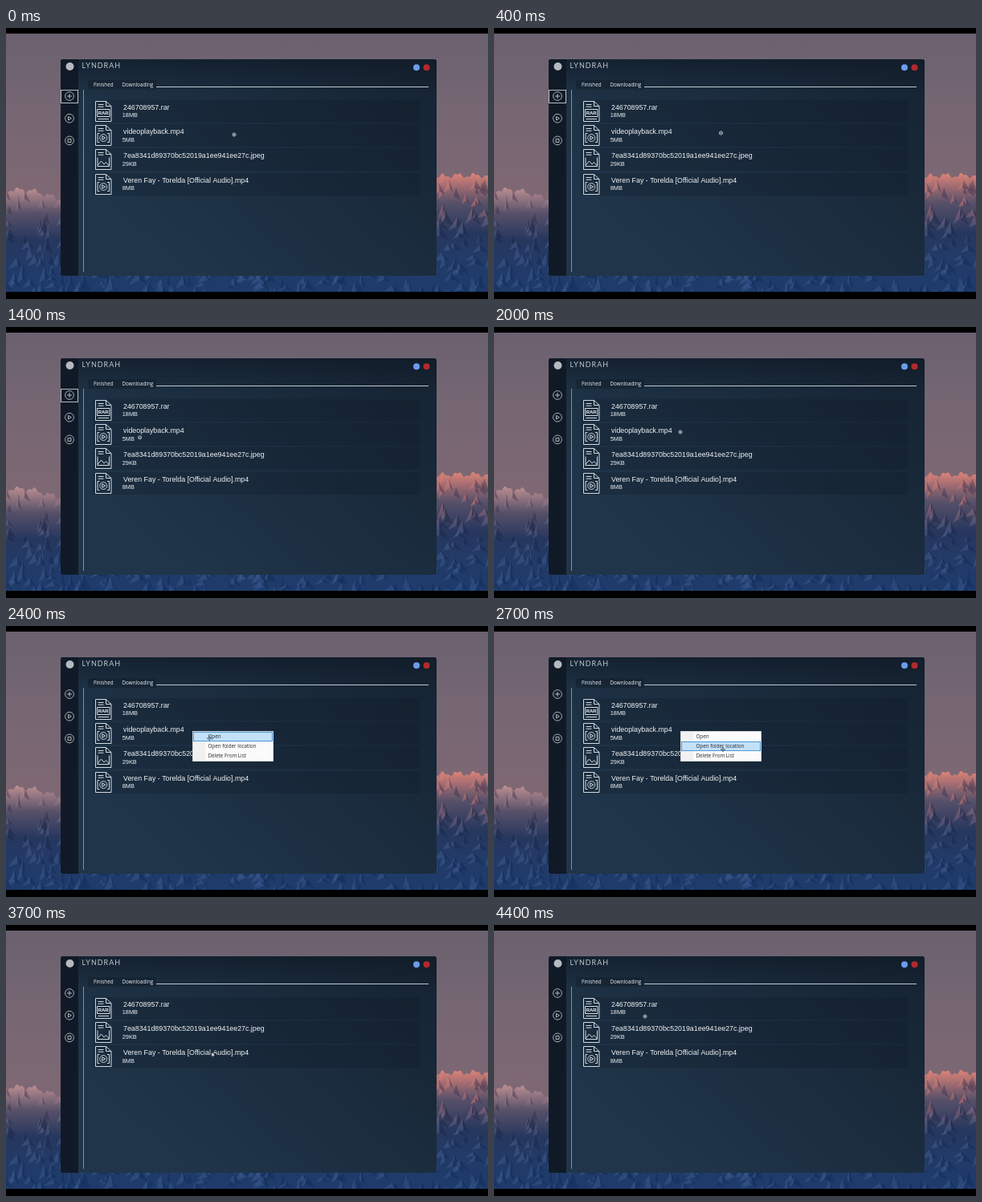
Write an HTML page with a canvas that moves like this. It is 600 by 338 pixels and loops after 4.5 s.

```html
<!DOCTYPE html>
<html lang="en">
<head>
<meta charset="utf-8">
<title>Download list</title>
<style>
html, body { margin: 0; width: 100%; height: 100%; overflow: hidden; background: #000; }
canvas { display: block; width: 600px; height: 338px; }
</style>
</head>
<body>
<canvas id="stage" width="600" height="338"></canvas>
<script>
const W = 600, H = 338, LOOP = 4500, STEP = 100;
const SKY_TOP = 7, SKY_END = 329;
const BLUR = 1800, MENU_OPEN = 2100, REMOVED = 3700;
const SANS = '"Liberation Sans", Arial, sans-serif';
const UI = '"Open Sans", "Noto Sans", sans-serif';
const INK = '#f0f2f4', STROKE = '#d3dadf', DIM = '#b4bcc3';

const view = document.getElementById('stage').getContext('2d');
const backdrop = document.createElement('canvas');
backdrop.width = W;
backdrop.height = H;
let g = backdrop.getContext('2d');

const files = [
  { name: '246708957.rar', size: '18MB', icon: 'rar' },
  { name: 'videoplayback.mp4', size: '5MB', icon: 'video' },
  { name: '7ea8341d89370bc52019a1ee941ee27c.jpeg', size: '29KB', icon: 'image' },
  { name: 'Veren Fay - Torelda [Official Audio].mp4', size: '8MB', icon: 'video' }
];
const menuItems = ['Open', 'Open folder location', 'Delete From List'];

// Each move glides the pointer to x, y between two times.
const home = { x: 284, y: 133 };
const moves = [
  { from: 0, to: 800, x: 281, y: 129 },
  { from: 1000, to: 1500, x: 138, y: 140 },
  { from: 1600, to: 2000, x: 232, y: 131 },
  { from: 2200, to: 2700, x: 285, y: 154 },
  { from: 2800, to: 3300, x: 257, y: 162 },
  { from: 3700, to: 4200, x: 196, y: 138 },
  { from: 4200, to: 4400, x: 188, y: 114 }
];

const shapes = {
  page: new Path2D('M0 0H13L19.5 6V25H0Z M13 0V6H19.5 M3 4H10 M3 6.7H10'),
  rar: new Path2D('M2 10H17.5V19H2Z M3 22H16.5'),
  video: new Path2D('M5 10H2.5V21H5 M14.5 10H17V21H14.5 M8.3 13.2L12.2 15.5L8.3 17.8Z'),
  image: new Path2D('M2.5 10V21H17V10 M2.5 20L7 14.5L10.5 18.5L13 16L17 20.5'),
  plus: new Path2D('M-3 0H3 M0 -3V3'),
  play: new Path2D('M-1.5 -2.3L2.3 0L-1.5 2.3Z'),
  stop: new Path2D('M-2 -2H2V2H-2Z'),
  cross: new Path2D('M-1.2 -1.2L1.2 1.2M1.2 -1.2L-1.2 1.2'),
  arrow: new Path2D('M-1 -3.5V2.5L.4 1.2L1.6 3.4L1.3 .9L3 .7Z')
};

function rect(x, y, w, h, color) {
  g.fillStyle = color;
  g.fillRect(x, y, w, h);
}

function frame(x, y, w, h, color, width = 1) {
  g.strokeStyle = color;
  g.lineWidth = width;
  g.strokeRect(x, y, w, h);
}

function shape(path, x, y, color, width = 1, fill) {
  g.save();
  g.translate(x, y);
  if (fill) {
    g.fillStyle = fill;
    g.fill(path);
  }
  g.strokeStyle = color;
  g.lineWidth = width;
  g.stroke(path);
  g.restore();
}

function circle(x, y, r) {
  g.beginPath();
  g.arc(x, y, r, 0, Math.PI * 2);
}

function disc(x, y, r, color) {
  circle(x, y, r);
  g.fillStyle = color;
  g.fill();
}

function ring(x, y, r, color, width = 0.9) {
  circle(x, y, r);
  g.strokeStyle = color;
  g.lineWidth = width;
  g.stroke();
}

function text(str, x, y, size, color = INK, family = SANS, weight = 400) {
  g.font = `${weight} ${size}px ${family}`;
  g.fillStyle = color;
  g.fillText(str, x, y);
}

// Evenly spaced colour stops.
function gradient(x0, y0, x1, y1, ...colors) {
  const fill = g.createLinearGradient(x0, y0, x1, y1);
  colors.forEach((color, i) => fill.addColorStop(i / (colors.length - 1), color));
  return fill;
}

function random(seed) {
  return () => (seed = seed * 16807 % 2147483647) / 2147483647;
}

function triangle(x, y, x1, y1, x2, y2, color) {
  g.beginPath();
  g.moveTo(x, y);
  g.lineTo(x1, y1);
  g.lineTo(x2, y2);
  g.fillStyle = color;
  g.fill();
}

// A jagged ridge filled with paired sunny and shaded facets.
function mountains(x0, x1, ridge, sun, haze, seed) {
  const rnd = random(seed);
  const top = Math.min(ridge(x0), ridge(x1)) - 3;
  const shade = (...colors) => gradient(0, top, 0, SKY_END, ...colors);
  const lit = shade(sun, haze, '#465984', '#395486', '#34538a');
  const dark = shade('#6b4c5e', '#3a3651', '#1a2a4c', '#152c56', '#14305e');

  g.save();
  g.beginPath();
  g.moveTo(x0, SKY_END);
  for (let x = x0; x <= x1; x += 2) g.lineTo(x, ridge(x));
  g.lineTo(x1, SKY_END);
  g.clip();
  rect(x0, top, x1 - x0, H, shade(sun, '#575069', '#27375e', '#213b68', '#1e3b6b'));
  g.globalAlpha = 0.6;
  const count = (x1 - x0) * 0.8;
  for (let i = 0; i < count; i++) {
    const x = x0 + rnd() * (x1 - x0);
    const y = top + (SKY_END - top) * i / count;
    const w = 3 + rnd() * 9, h = 7 + rnd() * 16, lean = (rnd() - 0.5) * 8;
    triangle(x, y, x - w, y + h, x + lean, y + h * 0.7, lit);
    triangle(x, y, x + w, y + h, x + lean, y + h * 0.7, dark);
  }
  g.restore();
}

function wallpaper() {
  const jag = x => 2.5 * Math.sin(x * 0.31) + 1.5 * Math.sin(x * 0.83);
  const left = x => 202 + Math.max(0, x - 30) * 0.3 + jag(x);
  const right = x => 184 + Math.max(0, 545 - x) * 0.4 + jag(x);
  rect(0, 0, W, H, '#000');
  rect(0, SKY_TOP, W, SKY_END - SKY_TOP,
    gradient(0, SKY_TOP, 0, 210, '#6b616f', '#776773', '#7e6874'));
  mountains(0, 300, left, '#bd8f91', '#716882', 71);
  mountains(300, W, right, '#dd8378', '#b0696e', 913);
  rect(0, SKY_END, W, H, '#000');
}

function appWindow() {
  g.save();
  g.beginPath();
  g.roundRect(68, 39, 468, 270, 3);
  g.clip();
  rect(68, 39, 468, 270, gradient(480, 30, 230, 309, '#162433', '#1b2d3f', '#203549'));
  rect(68, 39, 468, 40, gradient(0, 39, 0, 79, 'rgba(15,24,36,.6)', 'rgba(15,24,36,0)'));
  rect(68, 39, 22, 270, '#101a27');
  g.restore();

  disc(79.5, 48, 5, '#b5bac0');
  g.letterSpacing = '1px';
  text('LYNDRAH', 94.5, 50, 9, '#c0c9d1', 'Lato, sans-serif');
  g.letterSpacing = '0px';
  disc(511, 49.3, 4, '#6b9bed');
  disc(523.5, 49.3, 4, '#b02a2d');

  rect(102, 65, 85, 12, 'rgba(10,20,30,.3)');
  text('Finished', 109, 73.3, 6.3, INK, UI);
  text('Downloading', 144.5, 73.3, 6.3, INK, UI);
  rect(187, 73, 339, 1, '#c0c7cd');
  rect(96, 77, 1, 227, '#84909a');

  ['plus', 'play', 'stop'].forEach((name, i) => {
    const y = 85 + i * 27.7;
    ring(79, y, 5.4, DIM);
    shape(shapes[name], 79, y, DIM);
  });
}

function fileIcon(kind, x, y) {
  shape(shapes.page, x, y, STROKE);
  shape(shapes[kind], x, y, STROKE);
  if (kind === 'rar') text('RAR', x + 3.2, y + 16.8, 6, INK, SANS, 700);
  if (kind === 'video') ring(x + 9.75, y + 15.5, 4.5, STROKE);
}

function fileRow(file, i) {
  const y = 90 + i * 30.2, top = Math.round(y);
  rect(108, top, 407, 28, 'rgba(12,22,34,.22)');
  fileIcon(file.icon, 111.5, top + 1.5);
  text(file.name, 146, y + 11.9, 8.85);
  text(file.size, 144.7, y + 21.3, 7.4);
}

function contextMenu(pointer) {
  const left = 232, top = 131, rowH = 12;
  rect(left, top, 101, 38, '#fbfbfc');
  rect(left + 1, top + 1, 15, 36, '#f1f1f2');
  const hover = pointer.x > left + 1 ? Math.floor((pointer.y - top - 1) / rowH) : -1;
  menuItems.forEach((label, i) => {
    const y = top + 1 + i * rowH;
    if (i === hover) {
      rect(left + 1, y, 99, rowH, '#c3e1f8');
      frame(left + 1.5, y + 0.5, 98, rowH - 1, '#4a98d8');
    }
    text(label, left + 19.5, y + 8.3, 6.25, '#25282c', UI);
  });
  frame(left + 0.3, top + 0.3, 100.4, 37.4, '#b9bdc2', 0.6);
}

function pointerAt(t) {
  return moves.reduce((p, m) => {
    const k = Math.min(1, Math.max(0, (t - m.from) / (m.to - m.from)));
    return { x: p.x + (m.x - p.x) * k, y: p.y + (m.y - p.y) * k };
  }, home);
}

function drawPointer({ x, y }, t, menuShown) {
  if (t >= 3200 && t < 3900) {
    shape(shapes.arrow, x, y, '#2b343c', 0.6, '#f5f7f8');
  } else if (menuShown) {
    shape(shapes.plus, x, y, '#26313a');
    disc(x, y, 0.7, '#f4f6f7');
  } else {
    disc(x, y, 2.5, '#17242f');
    ring(x, y, 2.1, STROKE, 0.8);
    shape(shapes.cross, x, y, STROKE, 0.7);
  }
}

function draw(now) {
  const t = Math.floor(now % LOOP / STEP) * STEP;
  const pointer = pointerAt(t);
  const menuShown = t >= MENU_OPEN && t < REMOVED;
  g.drawImage(backdrop, 0, 0);
  if (t < BLUR) frame(68.5, 77.5, 21, 16, DIM);
  files.filter((_, i) => t < REMOVED || i !== 1).forEach(fileRow);
  if (menuShown) contextMenu(pointer);
  drawPointer(pointer, t, menuShown);
}

wallpaper();
appWindow();
g = view;

const start = performance.now();
function tick() {
  draw(performance.now() - start);
  requestAnimationFrame(tick);
}
tick();
</script>
</body>
</html>
```
